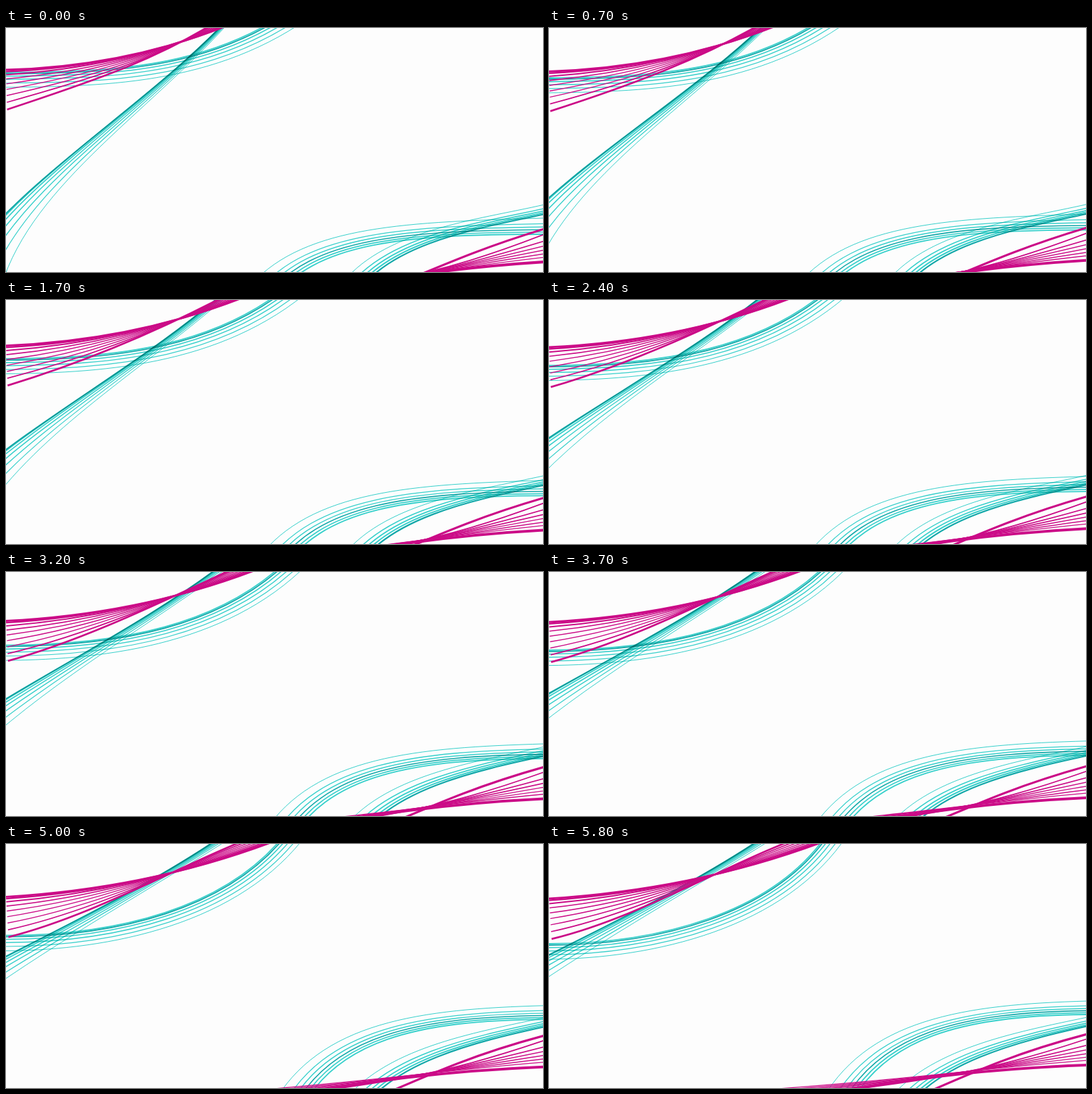
An HTML page with a canvas that plays this animation: 798x362 px, repeating every 5.9 s.

```html
<!DOCTYPE html>
<html lang="en">
<head>
<meta charset="utf-8">
<title>Flowing lines</title>
<style>
html, body { margin: 0; width: 100%; height: 100%; overflow: hidden; background: #fdfdfd; }
canvas { display: block; }
</style>
</head>
<body>
<canvas id="stage" width="798" height="362"></canvas>
<script>
const ctx = document.getElementById('stage').getContext('2d');
const LOOP = 5900, STEP = 100;
const MAGENTA = '#cb0b87', TEAL = '#35d2cd', DEEP = '#12a9aa';

const linear = s => s;
const easeOut = s => 1 - (1 - s) ** 2;

// A ribbon is a Bezier spine that moves between two poses. Each control point is
// [x, y, gap]; the lines fan out from the spine by up to that gap along the normal.
const tealRibbons = [
  { // arc, top left
    from: [[0, 66, 22], [150, 64, 22], [320, 65, 22], [460, -55, 26]],
    to: [[0, 148, 23], [150, 148, 22], [340, 108, 22], [422, -28, 26]],
    lines: 6, power: 1.5, accent: 1, widths: [1.8, 1], ease: s => s ** 1.1
  },
  { // diagonal, top left
    from: [[-60, 345, 65], [30, 218, 15], [215, 112, 10], [340, -24, 4]],
    to: [[-60, 194, 36], [80, 124, 14], [220, 58, 4], [330, -18, 10]],
    lines: 7, power: 1.8, accent: 0, widths: [1.8, 1], ease: easeOut
  },
  { // outer arc, bottom right
    from: [[365, 380, 40], [445, 292, 26], [600, 288, 18], [800, 282, 24]],
    to: [[400, 390, 42], [468, 258, 32], [620, 238, 16], [800, 233, 20]],
    lines: 6, power: .65, accent: 3, widths: [1, 1.8], ease: linear
  },
  { // inner arc, bottom right
    from: [[495, 385, 27], [555, 300, 22], [700, 285, 12], [800, 262, 14]],
    to: [[500, 385, 29], [562, 304, 24], [690, 280, 14], [800, 257, 13]],
    lines: 5, power: .65, accent: 4, widths: [1, 2.2], ease: linear
  }
];

const magentaRibbons = [
  { // fan, top left
    from: [[0, 62, 59], [110, 59, 25], [220, 40, 10], [330, -4, -14]],
    to: [[0, 81, 60], [140, 72, 35], [280, 46, -25], [420, -8, -18]],
    lines: 9, power: 1.5, widths: [2.8, 2.8], middle: 1.4, ease: linear
  },
  { // thin fan, bottom right
    from: [[300, 416, -14], [560, 380, -4], [640, 368, -10], [800, 306, 35]],
    to: [[300, 382, -16], [560, 352, -4], [640, 342, -10], [800, 289, 33]],
    lines: 6, power: .8, widths: [1.8, 1.3], ease: linear
  },
  { // steep edge of that fan
    from: [[540, 397, 0], [640, 356, 0], [700, 328, 0], [800, 298, 0]],
    to: [[540, 378, 0], [640, 334, 0], [700, 308, 0], [800, 282, 0]],
    lines: 1, power: 1, widths: [3.2, 3.2], ease: linear
  },
  { // flat edge of that fan
    from: [[440, 396, 0], [540, 377, 0], [640, 357, 0], [800, 347, 0]],
    to: [[440, 365, 0], [540, 349, 0], [640, 334, 0], [800, 328, 0]],
    lines: 1, power: 1, widths: [4, 4], ease: linear
  }
];

const mix = (a, b, u) => a + (b - a) * u;

// Shift each control point along the normal of the control polygon.
function offset(spine, u) {
  return spine.map(([x, y, gap], i) => {
    const a = spine[Math.max(i - 1, 0)], b = spine[Math.min(i + 1, 3)];
    const dx = b[0] - a[0], dy = b[1] - a[1], k = u * gap / Math.hypot(dx, dy);
    return [x - dy * k, y + dx * k];
  });
}

function drawRibbon(ribbon, s, colour) {
  const { from, to, lines, power, accent, widths, middle, ease } = ribbon;
  const e = ease(s);
  const spine = from.map((p, i) => p.map((v, c) => mix(v, to[i][c], e)));
  for (let i = 0; i < lines; i++) {
    const u = lines > 1 ? (i / (lines - 1)) ** power : 0;
    const [a, b, c, d] = offset(spine, u);
    const edge = mix(widths[0], widths[1], u);
    ctx.lineWidth = middle ? mix(middle, edge, Math.abs(2 * u - 1) ** 3) : edge;
    ctx.strokeStyle = i === accent ? DEEP : colour;
    ctx.beginPath();
    ctx.moveTo(...a);
    ctx.bezierCurveTo(...b, ...c, ...d);
    ctx.stroke();
  }
}

function draw(s) {
  ctx.globalCompositeOperation = 'source-over';
  ctx.fillStyle = '#fdfdfd';
  ctx.fillRect(0, 0, 798, 362);
  // Teal lines darken where they overlap.
  ctx.globalCompositeOperation = 'multiply';
  tealRibbons.forEach(r => drawRibbon(r, s, TEAL));
  ctx.globalCompositeOperation = 'source-over';
  magentaRibbons.forEach(r => drawRibbon(r, s, MAGENTA));
}

const start = performance.now();
function tick() {
  const ms = (performance.now() - start) % LOOP;
  draw(Math.floor(ms / STEP) * STEP / (LOOP - STEP));
  requestAnimationFrame(tick);
}
tick();
</script>
</body>
</html>
```
